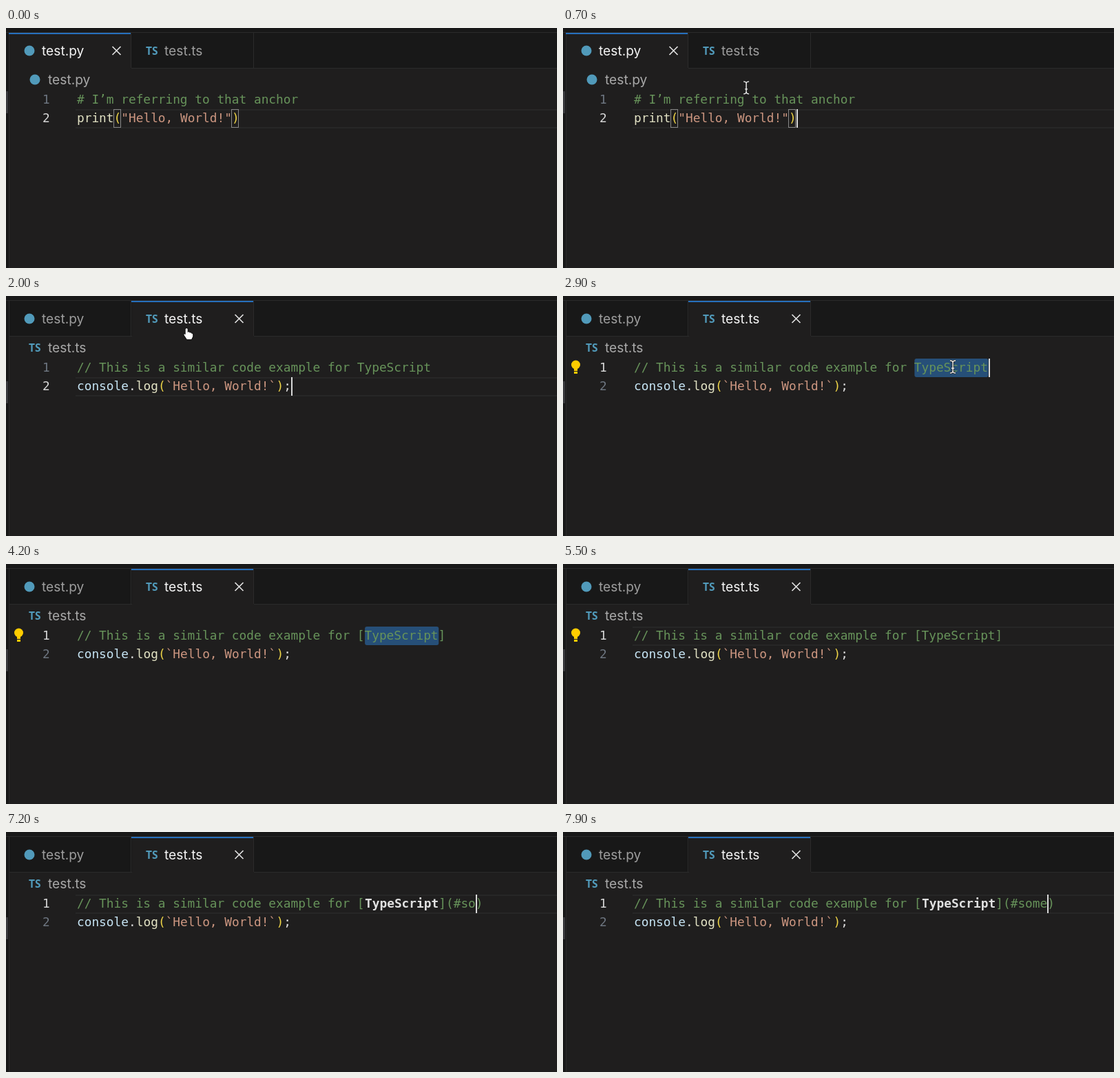
Recreate the animation shown at these times as an HTML page with a canvas. Size 800 px wide and 349 px high, loop 8 s.

```html
<!DOCTYPE html>
<html lang="en">
<head>
<meta charset="utf-8">
<title>Code editor</title>
<style>
  html, body { margin: 0; width: 100%; height: 100%; overflow: hidden; background: #1f1e1e; }
  canvas { display: block; }
</style>
</head>
<body>
<canvas id="stage" width="800" height="349"></canvas>
<script>
const ctx = document.getElementById('stage').getContext('2d');
const LOOP = 8000;
const MONO = '17.8px "DejaVu Sans Mono", monospace';
const UI = '19.2px Inter, sans-serif';
const BADGE = 'bold 15.5px "Open Sans", sans-serif';
const CODE_X = 103, ADVANCE = 10.72, LINE_TOP = 91, LINE_HEIGHT = 27;
const ICON_BLUE = '#519aba', GREEN = '#67935a', GOLD = '#efd548', STRING = '#cc9680';
const COMMENT = '// This is a similar code example for ';

// Each state holds from `at` until the next one; the caret blink restarts with it.
const states = [
  { at: -600, tab: 0, line: 2, col: 22 },
  { at: 1000, tab: 1, line: 2, col: 29, word: 'TypeScript' },
  { at: 2600, tab: 1, line: 1, col: 48, word: 'TypeScript', select: 38, bulb: true },
  { at: 3600, tab: 1, line: 1, col: 49, word: '[TypeScript]', select: 39, bulb: true },
  { at: 4500, tab: 1, line: 1, col: 49, word: '[TypeScript]', bulb: true },
  { at: 4700, tab: 1, line: 1, col: 50, word: '[TypeScript]', bulb: true },
  { at: 6100, tab: 1, line: 1, col: 51, word: '[TypeScript]()', bulb: true },
  ...[6700, 6900, 7100, 7400, 7600].map((at, i) => ({
    at, tab: 1, line: 1, col: 52 + i, link: '#some'.slice(0, i + 1)
  }))
];

const colX = col => CODE_X + col * ADVANCE;
const lineY = line => LINE_TOP + (line - 1) * LINE_HEIGHT;
const mix = (a, b, k) => a + (b - a) * k;

function rect(x, y, w, h, color) {
  ctx.fillStyle = color;
  ctx.fillRect(x, y, w, h);
}

function text(str, x, y, color, font) {
  ctx.font = font;
  ctx.fillStyle = color;
  ctx.fillText(str, x, y);
}

function disc(x, y, r, color) {
  ctx.fillStyle = color;
  ctx.beginPath();
  ctx.arc(x, y, r, 0, Math.PI * 2);
  ctx.fill();
}

// Draws [text, color, bold?] parts one after another on the character grid.
function code(line, parts) {
  let col = 0;
  for (const [str, color, bold] of parts) {
    text(str, colX(col), lineY(line) + 19, color, (bold ? 'bold ' : '') + MONO);
    col += str.length;
  }
}

function fileIcon(tab, x, y) {
  if (tab === 0) disc(x, y, 7.5, ICON_BLUE);
  else text('TS', x - 9, y + 5.5, ICON_BLUE, BADGE);
}

function drawFrame(active) {
  rect(0, 0, 800, 349, '#1f1e1e');
  rect(0, 0, 800, 58, '#181818');
  rect(0, 0, 5, 349, '#181818');
  rect(0, 6, 800, 1, '#2b2b2b');
  rect(5, 58, 795, 1, '#2b2b2b');
  rect(4, 7, 1, 342, '#2b2b2b');
  rect(0, active ? 124 : 92, 3, 32, '#3a3a3d');

  ['test.py', 'test.ts'].forEach((name, i) => {
    const left = 5 + i * 178, on = i === active;
    if (on) {
      rect(left, 7, 177, 52, '#1f1e1e');
      rect(left - 1, 7, 178, 2, '#2670bd');
      ctx.strokeStyle = '#e0e0e0';
      ctx.lineWidth = 1.7;
      ctx.beginPath();
      for (const d of [-6, 6]) {
        ctx.moveTo(left + 155.5 - d, 27);
        ctx.lineTo(left + 155.5 + d, 39);
      }
      ctx.stroke();
    }
    rect(left + 176, 7, 1, 51, '#2b2b2b');
    fileIcon(i, left + 29, 33);
    text(name, left + 47, 40, on ? '#f4f4f4' : '#9d9d9d', UI);
  });

  fileIcon(active, 42, 75);
  text(active ? 'test.ts' : 'test.py', 61, 82, '#a9a9a9', UI);
}

function drawCode(s) {
  if (s.select) {
    ctx.fillStyle = '#264f78';
    ctx.beginPath();
    ctx.roundRect(colX(s.select), LINE_TOP, 10 * ADVANCE, LINE_HEIGHT, 3);
    ctx.fill();
  } else {
    rect(101, lineY(s.line), 699, 2, '#272727');
    rect(101, lineY(s.line) + LINE_HEIGHT - 1, 699, 2, '#272727');
  }
  for (const n of [1, 2]) {
    text(String(n), 53, lineY(n) + 19, n === s.line ? '#d8d8d8' : '#6e7681', MONO);
  }

  if (s.tab === 0) {
    code(1, [['# I’m referring to that anchor', GREEN]]);
    code(2, [['print', '#e2e2c4'], ['(', GOLD], ['"Hello, World!"', STRING], [')', GOLD]]);
    ctx.strokeStyle = '#888888';
    ctx.lineWidth = 1;
    for (const col of [5, 21]) {
      ctx.strokeRect(Math.round(colX(col)) - 0.5, lineY(2) + 0.5, 10, 26);
    }
    return;
  }
  code(1, s.link
    ? [[COMMENT + '[', GREEN], ['TypeScript', '#e0e0e0', true], ['](' + s.link + ')', GREEN]]
    : [[COMMENT + s.word, GREEN]]);
  code(2, [['console', '#c6e4f4'], ['.', '#dddddd'], ['log', '#e2e2c4'], ['(', GOLD],
    ['`Hello, World!`', STRING], [')', GOLD], [';', '#dddddd']]);
}

function drawBulb() {
  disc(18.5, 100, 6.5, '#ffcc00');
  rect(16, 104, 5, 5, '#ffcc00');
  rect(16, 110, 5, 3, '#ffcc00');
}

function outlined(path) {
  const shape = new Path2D(path);
  ctx.lineJoin = 'round';
  ctx.lineWidth = 2;
  ctx.strokeStyle = '#111111';
  ctx.stroke(shape);
  ctx.fillStyle = '#ffffff';
  ctx.fill(shape);
}

function drawPointer(t) {
  if (t < 100 || t >= 3600) return;
  const ease = (from, to) => {
    const k = Math.min(1, Math.max(0, (t - from) / (to - from)));
    return k * k * (3 - 2 * k);
  };
  const toTab = ease(100, 900), toWord = ease(1900, 2500);
  const x = mix(mix(414, 239, toTab), 566, toWord);
  const y = mix(mix(288, 50, toTab), 103, toWord);
  ctx.save();
  ctx.translate(x, y);
  if (y < 58) {
    outlined('M-3-6 Q-1.5-8 0-6 V-1 Q2-2.5 3-.5 Q5-1.5 5.5 .5 Q7.5 0 7.5 2 V5 L5.5 9 H-1 L-5 3 Q-6 0-3 2 Z');
  } else {
    const beam = new Path2D('M-4-9 Q0-9 0-6 Q0-9 4-9 M0-6 V6 M-4 9 Q0 9 0 6 Q0 9 4 9 M-2 2 H2');
    for (const [width, color] of [[3, '#222222'], [1.4, '#eeeeee']]) {
      ctx.lineWidth = width;
      ctx.strokeStyle = color;
      ctx.stroke(beam);
    }
  }
  ctx.restore();
}

function draw() {
  const t = performance.now() % LOOP;
  const s = states.findLast(state => state.at <= t);
  drawFrame(s.tab);
  drawCode(s);
  if (s.bulb) drawBulb();
  if ((t - s.at) % 1000 < 500) {
    rect(Math.round(colX(s.col)), lineY(s.line), 2, LINE_HEIGHT, '#d8d8d8');
  }
  drawPointer(t);
  requestAnimationFrame(draw);
}
draw();
</script>
</body>
</html>
```
